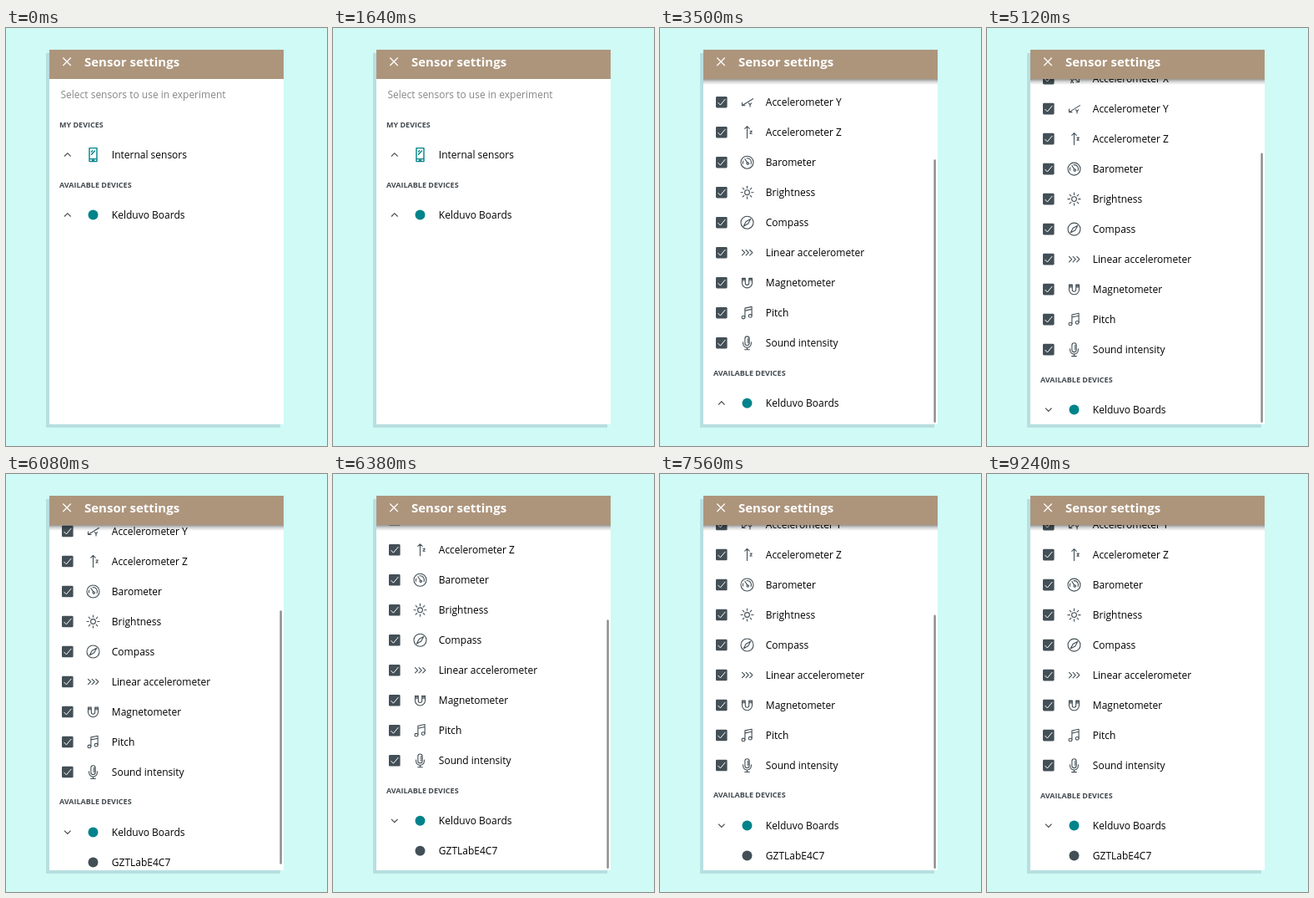
An HTML page that plays this animation: 385 by 500 pixels, repeating every 9.54 s.

```html
<!DOCTYPE html>
<html lang="en">
<head>
<meta charset="utf-8">
<title>Sensor settings</title>
<style>
  html, body { margin: 0; width: 100%; height: 100%; overflow: hidden; background: #cffaf5; }
  svg { display: block; width: 385px; height: 500px; font-family: "Open Sans", "Noto Sans", sans-serif; }
  .label { font-size: 12px; fill: #000; }
  .hint { font-size: 12px; fill: #868686; }
  .section { font-size: 9px; font-weight: 700; fill: #434a50; }
  .title { font-size: 15px; font-weight: 700; fill: #fff; }
  .line { fill: none; stroke: #434f56; stroke-width: 1.1; stroke-linecap: round; stroke-linejoin: round; }
  .teal { stroke: #00838a; stroke-width: 1.4; }
</style>
</head>
<body>
<svg viewBox="0 0 385 500">
  <defs>
    <clipPath id="view"><rect x="52" y="61" width="281" height="413"/></clipPath>
    <clipPath id="reveal"><rect id="revealBox" x="52" y="169" width="281" height="0"/></clipPath>
    <linearGradient id="fade" x2="0" y2="1">
      <stop offset="0" stop-color="#000" stop-opacity=".42"/>
      <stop offset=".45" stop-color="#000" stop-opacity=".17"/>
      <stop offset="1" stop-color="#000" stop-opacity="0"/>
    </linearGradient>
  </defs>
  <rect x="48" y="30" width="281" height="448" fill="#b8dee0"/>
  <rect x="52" y="26" width="281" height="448" fill="#fff"/>
  <g clip-path="url(#view)">
    <g id="content">
      <text class="hint" x="65.5" y="83.5">Select sensors to use in experiment</text>
      <text class="section" x="64" y="118.6">MY DEVICES</text>
      <g id="internal"></g>
      <g id="sensors" clip-path="url(#reveal)"></g>
      <g id="lower"><text class="section" x="64" y="190.6">AVAILABLE DEVICES</text></g>
    </g>
    <rect id="bar" x="328.4" width="2.4" rx="1.2" fill="#8a8a8a"/>
    <rect id="shadow" x="52" y="61" width="281" height="7" fill="url(#fade)"/>
  </g>
  <rect x="52" y="26" width="281" height="35" fill="#ad957c"/>
  <path d="M68.3 35.5l9.5 9.5m0-9.5l-9.5 9.5" stroke="#fff" stroke-width="1.2"/>
  <text class="title" x="94" y="46">Sensor settings</text>
</svg>
<script>
const $ = id => document.getElementById(id);
const LOOP = 9540, ROW = 36, FIRST = 187.6;

const line = (d, cls = "") => `<path class="line ${cls}" d="${d}"/>`;
const ring = r => `<circle class="line" r="${r}"/>`;
const dot = color => `<circle r="6" fill="${color}"/>`;
const rays = [...Array(8).keys()].map(i =>
  `<path class="line" d="M0-5.2V-7.5" transform="rotate(${i * 45})"/>`).join("");

const sensors = [
  ["Accelerometer X", line("M-6-4L6 4M2.5 4.2H6V.8M-4 1l3 4m0-4l-3 4")],
  ["Accelerometer Y", line("M7-4L-6 4M-6 .5V4h3.5M2 1.2l1.5 2L5 1.2M3.5 3.2V5.4")],
  ["Accelerometer Z", line("M0 7V-7M-2.7-4.3L0-7l2.7 2.7M3.5-1.5h2.3L3.5 1.5h2.3")],
  ["Barometer", ring(7.5) + line("M-2.6-4L.2.4M-5 1.5A5 5 0 0 1-4.7-1.6M-.4-5A5 5 0 0 1 4.6 2") +
    `<circle class="line" cx=".8" cy="1.4" r="1.2"/>`],
  ["Brightness", ring(2.9) + rays],
  ["Compass", ring(7.5) + line("M4.2-4.2L1.3 1.3L-4.2 4.2L-1.3-1.3Z")],
  ["Linear accelerometer", line("M-6-3.2l3.2 3.2l-3.2 3.2M-1.4-3.2L1.8 0l-3.2 3.2M3.2-3.2L6.4 0L3.2 3.2")],
  ["Magnetometer", line("M-6-5.5h3.8V.5a2.2 2.2 0 0 0 4.4 0v-6H6V.2a6 6 0 0 1-12 0ZM-6-2.7h3.8M2.2-2.7H6M-5-4.3h2M3-4.3h2")],
  ["Pitch", line("M-2.6 5V-5.6L5.6-7.3V3.3M-2.6-2.6L5.6-4.3") +
    `<ellipse class="line" cx="-4.5" cy="5.4" rx="2" ry="1.8"/><ellipse class="line" cx="3.7" cy="3.7" rx="2" ry="1.8"/>`],
  ["Sound intensity", line("M-2.6-5.2a2.6 2.6 0 0 1 5.2 0V.4a2.6 2.6 0 0 1-5.2 0ZM-4.9-.8V.6a4.9 4.9 0 0 0 9.8 0V-.8M0 5.5V8M-2.8 8H2.8M.4-4.6h2M.4-2.6h2M.4-.6h2")]
];

const phone = line("M-4.5-8h9V8h-9ZM-4.5 5h9M-1.2 6.6h2.4M-2-.4L2-4.6M-2-3.6l1.2-1.3", "teal");
const check = `<rect x="-6.8" y="-6.8" width="13.6" height="13.6" rx="1.4" fill="#434f56"/>
  <path d="M-4.3.4L-1.4 3.4L4.5-3.6" fill="none" stroke="#fff" stroke-width="1"/>`;
const chevron = id => `<path id="${id}" d="M-3.8 1.9L0-1.9L3.8 1.9" fill="none" stroke="#444" stroke-width="1.1"/>`;

const row = (y, name, icon, lead = "") => `<g transform="translate(0 ${y})">
  <g transform="translate(73.8 0)">${lead}</g>
  <g transform="translate(104.5 0)">${icon}</g>
  <text class="label" x="126.8" y="4.4">${name}</text></g>`;
const add = (id, html) => $(id).insertAdjacentHTML("beforeend", html);

add("internal", row(FIRST - ROW, "Internal sensors", phone, chevron("chevA")));
add("sensors", sensors.map(([name, icon], i) => row(FIRST + i * ROW, name, icon, check)).join(""));
add("lower", row(FIRST + ROW, "Kelduvo Boards", dot("#00838a"), chevron("chevB")));
add("lower", `<g id="board">${row(FIRST + 2 * ROW, "GZTLabE4C7", dot("#434f56"))}</g>`);

const ramp = (t, a, b) => Math.min(1, Math.max(0, (t - a) / (b - a)));
const smooth = p => p * p * (3 - 2 * p);
const easeOut = (p, n) => 1 - (1 - p) ** n;
// Critically damped return after the finger lets go
const settle = ms => { const k = ms * .008; return (1 + k) * Math.exp(-k); };

function scrollAt(t) {
  if (t < 3370) return 137 * easeOut(ramp(t, 2540, 2980), 2) + ramp(t, 3000, 3300);
  if (t < 5660) return 127 + 11 * settle(t - 3370);
  if (t < 6740) return 127 + 46.7 * easeOut(ramp(t, 5660, 6600), 1.55);
  return 163 + 10.7 * settle(t - 6740);
}

function draw(now) {
  const t = now % LOOP;
  const open = smooth(ramp(t, 1880, 2040)), openB = ramp(t, 4560, 4660);
  const grow = open * ROW * sensors.length;
  const s = scrollAt(t), max = t < 5660 ? 127 : 163;

  $("revealBox").setAttribute("height", grow);
  $("lower").setAttribute("transform", `translate(0 ${grow})`);
  $("content").setAttribute("transform", `translate(0 ${-s})`);
  $("chevA").setAttribute("transform", `rotate(${180 * open})`);
  $("chevB").setAttribute("transform", `rotate(${180 * openB})`);
  $("board").setAttribute("opacity", openB);

  const full = 414 * 448 / (448 + max), over = Math.max(0, s - max);
  const top = 61 + (411 - full) * Math.min(1, s / max) + over;
  $("bar").setAttribute("y", top);
  $("bar").setAttribute("height", full - over);
  $("bar").setAttribute("opacity", ramp(t, 2530, 2600) * (1 - ramp(t, 8390, 8640)));
  $("shadow").setAttribute("opacity", Math.min(1, s / 5));
}

const start = performance.now();
function tick() {
  draw(performance.now() - start);
  requestAnimationFrame(tick);
}
tick();
</script>
</body>
</html>
```
